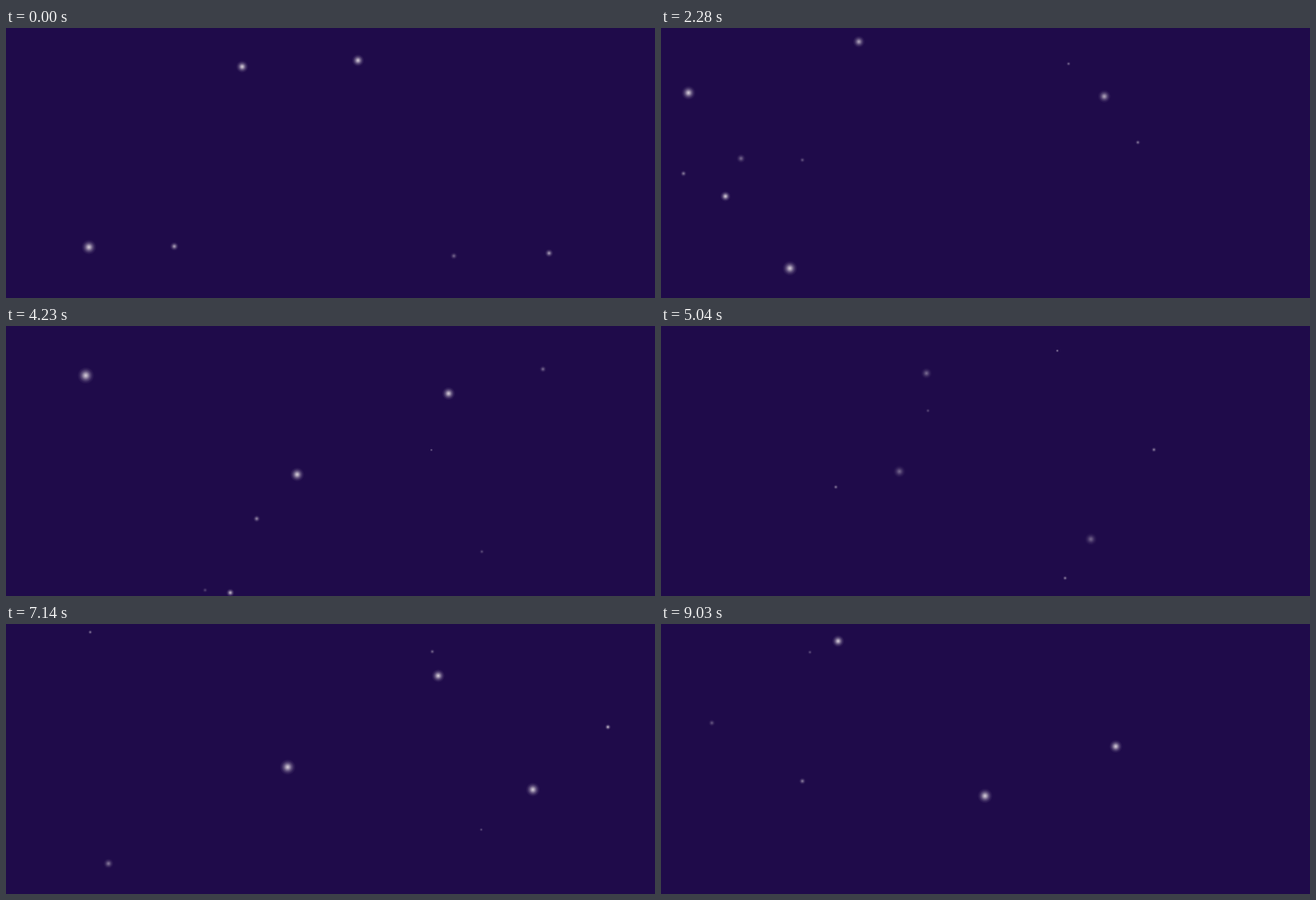
An HTML page that plays this animation: 720 by 300 pixels, repeating every 9060 ms.

```html
<!DOCTYPE html>
<html lang="en">
<head>
<meta charset="utf-8">
<title>Drifting lights</title>
<style>
  html, body { margin: 0; width: 100%; height: 100%; overflow: hidden; background: #1f0b4a; }
  svg { display: block; width: 720px; height: 300px; }
</style>
</head>
<body>
<svg viewBox="0 0 720 300" xmlns="http://www.w3.org/2000/svg">
  <defs>
    <radialGradient id="glow">
      <stop offset="0" stop-color="#f4edf0"/>
      <stop offset=".2" stop-color="#f4edf0" stop-opacity=".77"/>
      <stop offset=".5" stop-color="#f4edf0" stop-opacity=".33"/>
      <stop offset=".75" stop-color="#f4edf0" stop-opacity=".1"/>
      <stop offset="1" stop-color="#f4edf0" stop-opacity="0"/>
    </radialGradient>
    <clipPath id="view"><rect width="705" height="300"/></clipPath>
  </defs>
  <rect width="720" height="300" fill="#1f0b4a"/>
  <g id="lights" clip-path="url(#view)" fill="url(#glow)"></g>
</svg>
<script>
const WIDTH = 705, HEIGHT = 300;
const LOOP = 9060, STEP = 30, PULSE = 1050, TWINKLE = 1400;
const FAINT_COUNT = 22;
const layer = document.getElementById('lights');
const lights = [];

let seed = 41;
function random(lo, hi) {
  seed = (seed * 16807) % 2147483647;
  return lo + (hi - lo) * seed / 2147483647;
}

// A light passes (x, y) at the given time, climbing steadily with a slight drift.
function addLight(time, x, y, size, alpha) {
  const el = document.createElementNS('http://www.w3.org/2000/svg', 'circle');
  layer.append(el);
  const vx = random(-.05, .05), vy = -random(.13, .19);
  lights.push({ time, x, y, size, alpha, vx, vy, el });
}

function addBright(time, ...points) {
  for (const [x, y, size] of points) addLight(time, x, y, size, .85);
}

// The bright lights anchor the composition.
addBright(0, [262, 43, 7], [390.5, 36, 7], [92, 243.5, 8.5]);
addBright(1170, [76, 147.5, 7], [180.5, 181, 7], [467, 240, 7.5]);
addBright(2280, [30.5, 72, 8], [71.5, 187, 6], [143, 267, 8.5]);
addBright(4230, [88.5, 55, 9.5], [491, 75, 7.5], [323, 165, 8]);
addBright(5820, [279.5, 32, 9.5], [498, 97.5, 9.5], [328.5, 218, 10]);
addBright(7140, [479.5, 57.5, 7.5], [312.5, 159, 9], [584.5, 184, 8]);
addBright(9030, [196.5, 19, 7], [504.5, 136, 7.5], [359.5, 191, 8.5]);

// Small faint lights spread evenly in time, denser toward the left.
for (let i = 0; i < FAINT_COUNT; i++) {
  const time = (i + random(0, 1)) / FAINT_COUNT * LOOP;
  const x = WIDTH * random(0, 1) ** 1.4;
  addLight(time, x, random(0, HEIGHT), random(3, 6.5), random(.4, .8));
}

// Eases between 1 at zero age and the given low value half a period later.
function wave(age, period, low) {
  return low + (1 - low) * (1 + Math.cos(2 * Math.PI * age / period)) / 2;
}

function draw(t) {
  for (const { time, x, y, size, alpha, vx, vy, el } of lights) {
    const age = t - time;
    el.setAttribute('cx', x + vx * age);
    el.setAttribute('cy', y + vy * age);
    el.setAttribute('r', size * wave(age, PULSE, .5));
    el.setAttribute('opacity', alpha * wave(age, TWINKLE, .45));
  }
}

let origin;
function tick(now) {
  origin ??= now;
  draw(Math.floor((now - origin) % LOOP / STEP) * STEP);
  requestAnimationFrame(tick);
}
draw(0);
requestAnimationFrame(tick);
</script>
</body>
</html>
```
